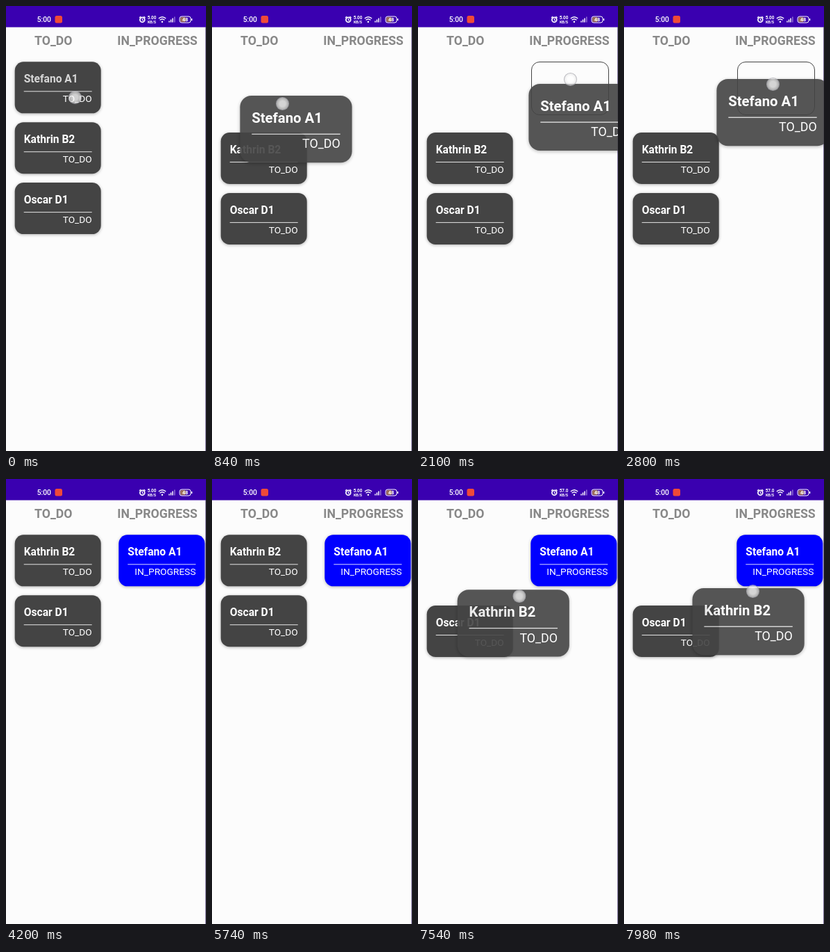
Recreate the animation shown at these times as an HTML page. Size 288 by 640 pixels, loop 8 s.

```html
<!DOCTYPE html>
<html lang="en">
<head>
<meta charset="utf-8">
<title>Task board</title>
<style>
html, body { margin: 0; width: 100%; height: 100%; overflow: hidden; }
#stage { position: relative; width: 288px; height: 640px; overflow: hidden; background: #fcfcfc; font-family: Roboto, Arial, sans-serif; }
#stage > * { position: absolute; left: 0; top: 0; }
.card { width: 124px; height: 74px; border-radius: 12.5px; background: #444; color: #fff; box-shadow: 0 1px 4px rgba(0, 0, 0, .3); transform-origin: 0 0; }
.card * { position: absolute; line-height: 0; white-space: nowrap; }
.card b { left: 13px; top: 25px; font-size: 15.6px; }
.card i { left: 13px; top: 42px; width: 98px; height: 1px; background: rgba(255, 255, 255, .85); }
.card span { right: 13px; top: 53px; font-size: 13.7px; }
.blue { background: #00f; }
.drag { opacity: .9; }
#slot { left: 162.5px; top: 80px; width: 110px; height: 75px; border: 1px solid #444; border-radius: 12px; }
#touch { width: 17px; height: 17px; margin: -9.5px; border: 1px solid rgba(140, 140, 150, .5); border-radius: 50%; background: radial-gradient(rgba(255, 255, 255, .75) 35%, rgba(225, 225, 225, .6) 75%); }
</style>
</head>
<body>
<div id="stage">
  <svg width="288" height="640" fill="#fff">
    <rect width="288" height="30.5" fill="#3a00b0"/>
    <rect x="287" y="30" width="1" height="610" fill="#56487c" opacity=".8"/>
    <text x="44.7" y="23" font-size="10.3" font-weight="500">5:00</text>
    <rect x="70.5" y="14" width="10.5" height="10.5" rx="2.5" fill="#f04a38"/>
    <g fill="none" stroke="#fff">
      <circle cx="196.3" cy="19.8" r="3.4" stroke-width="1.7"/>
      <path d="M192 17l2.2-2M200.6 17l-2.2-2M196.3 18v2l1.4 1" stroke-width="1.1"/>
      <path d="M219.8 18q5.2-4.6 10.4 0M221.6 20.2q3.4-3 6.8 0" stroke-width="1.4"/>
      <path d="M235 23.5v-2M237.5 23.5v-4M240 23.5v-6" stroke-width="1.5"/>
      <path d="M242.8 23.5v-8" stroke-width="1.5" opacity=".45"/>
      <rect x="250" y="15" width="16" height="9" rx="3"/>
    </g>
    <circle cx="224.9" cy="22.8" r="1.2"/>
    <rect x="251" y="16" width="8" height="7" rx="2" fill="#c09440" opacity=".75"/>
    <rect x="266.8" y="18" width="1.4" height="3"/>
    <text x="258" y="22.3" font-size="7.5" font-weight="700" text-anchor="middle">48</text>
    <g font-size="6.3" font-weight="700" text-anchor="middle">
      <text id="rate" x="210" y="18.9">5.00</text>
      <text x="210" y="24.6" font-size="5.4">KB/S</text>
    </g>
    <g font-size="17.7" font-weight="700" fill="#888" text-anchor="middle">
      <text x="68.3" y="56">TO_DO</text>
      <text x="218" y="56">IN_PROGRESS</text>
    </g>
  </svg>
  <div id="slot"></div>
</div>
<script>
const LOOP = 8000, LAG = 100, ZOOM = 1.3;
const LIFT = 40, DROP = 2900, PRESS = 6500, LIFT_AGAIN = 6980;
const stage = document.getElementById('stage');
const slot = document.getElementById('slot');
const rate = document.getElementById('rate');

// Finger paths through a few points: time, x, y
const firstPath = [
  [0, 99, 131], [740, 121, 136], [840, 101, 140], [1280, 134, 172],
  [1380, 143, 185], [2000, 240, 119], [2100, 219, 105], [2500, 214, 112]
];
const secondPath = [[LIFT_AGAIN, 109, 122], [7500, 142, 168], [7880, 179, 164], [7980, 185, 161]];

// Smooth curve through the points, resting at both ends
function along(path, t) {
  const last = path.length - 1;
  t = Math.min(path[last][0], Math.max(path[0][0], t));
  let k = 0;
  while (k < last - 1 && t > path[k + 1][0]) k++;
  const a = path[k], b = path[k + 1], span = b[0] - a[0], p = (t - a[0]) / span;
  const speed = (i, c) => {
    if (i === 0 || i === last) return 0;
    const slope = j => (path[j + 1][c] - path[j][c]) / (path[j + 1][0] - path[j][0]);
    const before = slope(i - 1), after = slope(i);
    return before * after > 0 ? 2 * before * after / (before + after) : 0;
  };
  return [1, 2].map(c => {
    const q = 1 - p;
    return a[c] * q * q * (1 + 2 * p) + b[c] * p * p * (3 - 2 * p)
      + span * p * q * (speed(k, c) * q - speed(k + 1, c) * p);
  });
}

// A lifted card hangs centred on the finger and trails it a little
function carried(path, t) {
  const [x, y] = along(path, t - LAG);
  return [x - 62 * ZOOM, y - 7];
}

function add(cls, html = '') {
  const el = document.createElement('div');
  el.className = cls;
  el.innerHTML = html;
  return stage.appendChild(el);
}

const card = (cls, name, state) => add('card ' + cls, `<b>${name}</b><i></i><span>${state}</span>`);
const names = ['Stefano A1', 'Kathrin B2', 'Oscar D1'];
const cards = names.map(n => card('', n, 'TO_DO'));
const done = card('blue', names[0], 'IN_PROGRESS');
const lifted = names.slice(0, 2).map(n => card('drag', n, 'TO_DO'));
const touch = add('');
touch.id = 'touch';
cards[0].firstChild.style.opacity = .78;

function place(el, pos, scale = 1) {
  el.style.display = pos ? '' : 'none';
  if (pos) el.style.transform = `translate(${pos[0]}px, ${pos[1]}px) scale(${scale})`;
}

function draw(t) {
  const first = t >= LIFT && t < DROP;
  const second = t >= LIFT_AGAIN;
  const top = first || second ? 182 : 80.3;
  const gone = (t >= LIFT) + second;
  const finger = t < DROP ? along(firstPath, t) : t >= PRESS ? along(secondPath, t) : null;

  cards.forEach((el, i) => place(el, i >= gone ? [12.7, top + (i - gone) * 86.9] : null));
  place(done, t >= DROP ? [162.3, 80.3] : null);
  place(lifted[0], first ? carried(firstPath, t) : null, ZOOM);
  place(lifted[1], second ? carried(secondPath, t) : null, ZOOM);
  slot.style.display = first && finger[0] > 160 ? '' : 'none';
  place(touch, finger);
  rate.textContent = t < 7280 ? '5.00' : '57.0';
}

const start = performance.now();
function tick() {
  draw((performance.now() - start) % LOOP);
  requestAnimationFrame(tick);
}
draw(0);
requestAnimationFrame(tick);
</script>
</body>
</html>
```
